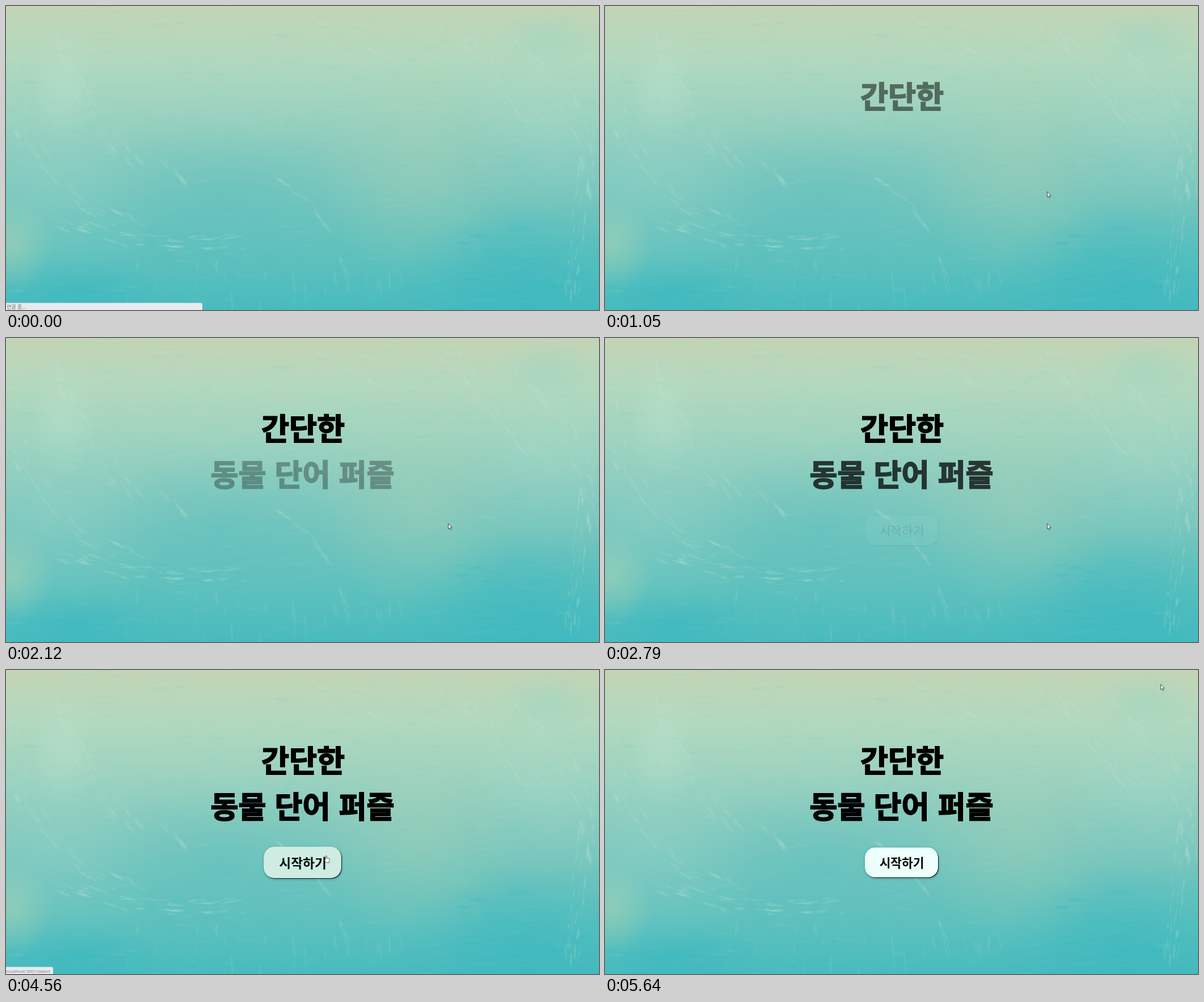
An HTML page with a canvas that plays this animation: 1045 px wide and 536 px high, repeating every 5660 ms.

```html
<!DOCTYPE html>
<html lang="ko">
<head>
<meta charset="utf-8">
<title>간단한 동물 단어 퍼즐</title>
<style>
  html, body { margin: 0; width: 100%; height: 100%; overflow: hidden; }
  body { position: relative; background: #7cc8bf; }
  #paint, #scene { position: absolute; left: 0; top: 0; width: 1045px; height: 536px; }
  #scene { overflow: hidden; }
  .title, .label {
    font-family: "Noto Sans CJK KR", "Noto Sans KR", "Noto Sans CJK", sans-serif;
    text-anchor: middle;
  }
  .title { font-size: 53.3px; font-weight: 900; stroke: #000; stroke-width: 1.8px; }
  .label { font-size: 21.4px; font-weight: 700; }
  .bar { fill: #e9eaee; }
  .note { font: 9px "Noto Sans CJK KR", "Noto Sans KR", "Noto Sans CJK", sans-serif; fill: #777; }
  .link { font: 7.9px "Open Sans", sans-serif; fill: #777; }
  #start { transform-box: view-box; transform-origin: 522.5px 339.5px; }
  #face { filter: drop-shadow(1px 1px .6px rgba(0,0,0,.85)) drop-shadow(0 1px 2px rgba(0,0,0,.3)); }
</style>
</head>
<body>
<canvas id="paint" width="1045" height="536"></canvas>
<svg id="scene" viewBox="0 0 1045 536">
  <text id="line1" class="title" x="523.5" y="179.5">간단한</text>
  <text id="line2" class="title" x="522.5" y="261">동물 단어 퍼즐</text>
  <g id="start">
    <rect id="face" x="458" y="313" width="129" height="52.5" rx="18" fill="#ecfffa"/>
    <text class="label" x="523" y="348">시작하기</text>
  </g>
  <g id="loading">
    <path class="bar" d="M0 523.5H343Q346 523.5 346 526.5V536H0Z"/>
    <text class="note" x="1" y="534">연결 중...</text>
  </g>
  <g id="address">
    <path class="bar" d="M0 523.5H80Q83 523.5 83 526.5V536H0Z"/>
    <text class="link" x="0.5" y="533.7">localhost:3001/select</text>
  </g>
  <g id="pointer">
    <path id="arrow" d="M.4 .4V9.8L2.5 7.8L4 11.2L5.6 10.5L4.2 7.2H6.9Z" fill="#fff" stroke="#222" stroke-width=".8"/>
    <path id="hand" d="M-.8 .6Q.3 -.7 1.1 .6V4.4L5 5Q6.3 5.3 6.2 6.7L5.3 10.3V12.3H.1L-2.8 8.1Q-3.4 6.7 -2.2 6.5L-.8 7.6Z" fill="#fff" stroke="#333" stroke-width=".8"/>
  </g>
</svg>
<script>
const LOOP = 5660, W = 1045, H = 536;
const TEAL = '50,182,193', SAND = '178,212,178', PALE = '196,232,214';
const $ = id => document.getElementById(id);
const ctx = $('paint').getContext('2d');

let seed = 41;
function rand(lo = 0, hi = 1) {
  seed = (seed * 1664525 + 1013904223) % 4294967296;
  return lo + (hi - lo) * seed / 4294967296;
}

function base() {
  const fill = ctx.createLinearGradient(0, 0, 0, H);
  ['#c3d4b5', '#b2d8be', '#9ed3bf', '#85cabe', '#70c4bd', '#5dc0bd', '#48bbbe']
    .forEach((c, i) => fill.addColorStop(i / 6, c));
  ctx.fillStyle = fill;
  ctx.fillRect(0, 0, W, H);
}

// Soft elliptical wash of one colour
function wash(x, y, rx, ry, rgb, alpha) {
  ctx.save();
  ctx.translate(x, y);
  ctx.scale(rx, ry);
  const g = ctx.createRadialGradient(0, 0, 0, 0, 0, 1);
  g.addColorStop(0, `rgba(${rgb},${alpha})`);
  g.addColorStop(.5, `rgba(${rgb},${alpha * .5})`);
  g.addColorStop(1, `rgba(${rgb},0)`);
  ctx.fillStyle = g;
  ctx.fillRect(-1, -1, 2, 2);
  ctx.restore();
}

// Ragged, tapered brush mark centred on x, y
function mark(x, y, length, width, angle, alpha, rgb = PALE) {
  const n = Math.max(5, Math.round(length / 4));
  ctx.save();
  ctx.translate(x, y);
  ctx.rotate(angle);
  ctx.fillStyle = `rgba(${rgb},${alpha})`;
  ctx.beginPath();
  for (let i = 0; i <= 2 * n; i++) {
    const u = i <= n ? i / n : 2 - i / n;
    const side = i <= n ? -1 : 1;
    ctx.lineTo((u - .5) * length, side * width / 2 * Math.sin(Math.PI * u) * rand(.25, 1.2));
  }
  ctx.fill();
  ctx.restore();
}

// Marks along the curve a, b, c, turned to follow it
function trail(a, b, c, count, spread) {
  for (let i = 0; i < count; i++) {
    const u = rand(), v = 1 - u;
    const at = k => v * v * a[k] + 2 * u * v * b[k] + u * u * c[k];
    const slope = k => v * (b[k] - a[k]) + u * (c[k] - b[k]);
    mark(at(0) + rand(-spread, spread), at(1) + rand(-spread, spread) / 2,
      rand(10, 42), rand(2, 7), Math.atan2(slope(1), slope(0)) + rand(-.12, .12), rand(.08, .22));
  }
}

// Horizontal grain over a region
function grain(count, left, top, right, bottom, alpha, pick) {
  for (let i = 0; i < count; i++) {
    mark(rand(left, right), rand(top, bottom), rand(10, 48), rand(2, 8),
      rand(-.12, .12), rand(alpha / 3, alpha), pick());
  }
}

function paint() {
  base();
  wash(920, 490, 240, 150, TEAL, .5);
  wash(120, 505, 150, 65, TEAL, .45);
  wash(380, 330, 240, 130, TEAL, .16);
  wash(950, 60, 90, 55, '140,214,195', .35);
  wash(730, 290, 180, 200, SAND, .34);
  wash(10, 420, 75, 85, SAND, .5);
  wash(80, 320, 210, 190, PALE, .16);
  wash(100, 140, 60, 110, PALE, .3);
  wash(960, 230, 150, 160, PALE, .14);

  grain(1000, 0, 0, W, H, .055, () => rand() < .5 ? PALE : '70,188,190');
  grain(100, 800, 390, 990, H, .15, () => TEAL);

  // Left side fans from upright to flat, right side from slanted to upright
  trail([95, 60], [115, 160], [240, 290], 34, 20);
  trail([5, 90], [20, 320], [240, 390], 38, 20);
  trail([110, 380], [200, 430], [420, 415], 44, 26);
  trail([265, 262], [300, 290], [325, 325], 8, 5);
  trail([480, 305], [585, 365], [610, 515], 18, 5);
  trail([535, 22], [600, 50], [665, 90], 7, 4);
  trail([765, 0], [820, 90], [950, 220], 44, 20);
  trail([900, 50], [1045, 190], [1030, 350], 46, 18);
  trail([1025, 270], [1005, 400], [995, 520], 30, 14);
  for (let i = 0; i < 24; i++) {
    mark(rand(150, 720), rand(440, H), rand(15, 55), rand(2, 8), rand(1.3, 1.7), rand(.05, .14));
  }
}

// Steps are [time, value, easing]; equal times make a hard change
function play(id, prop, steps) {
  const all = [[0, steps[0][1]], ...steps, [LOOP, steps[steps.length - 1][1]]];
  const frames = all.map(([t, value, easing = 'linear']) => ({ offset: t / LOOP, [prop]: value, easing }));
  $(id).animate(frames, { duration: LOOP, iterations: Infinity });
}

const fade = (id, from, length) => play(id, 'opacity', [[from, 0], [from + length, 1]]);

function show(id, from, to) {
  play(id, 'opacity', [[from, 0], [from, 1], [to, 1], [to, 0]]);
}

function hover(id, prop, rest, active) {
  play(id, prop, [[4060, rest], [4210, active], [5130, active], [5340, rest]]);
}

paint();
fade('line1', 560, 980);
fade('line2', 1650, 1540);
fade('start', 2680, 2010);
hover('start', 'transform', 'scale(1)', 'scale(1.06)');
hover('face', 'fill', '#ecfffa', '#d6efe5');
play('loading', 'opacity', [[300, 1], [300, 0]]);
show('address', 4380, 5180);
show('hand', 3900, 4580);
play('arrow', 'opacity', [[3900, 1], [3900, 0], [4580, 0], [4580, 1]]);

const at = (x, y) => `translate(${x}px,${y}px)`;
const above = at(986, -16), rest = at(779, 327), button = at(561, 329);
play('pointer', 'transform', [
  [50, above, 'ease-in-out'], [590, rest], [3720, rest, 'ease-in-out'],
  [3970, button], [4540, button, 'ease-in-out'], [4890, at(1007.5, 83), 'ease-in-out'],
  [5300, above], [5540, above, 'ease-out'], [5640, at(979, 25)]
]);
</script>
</body>
</html>
```
